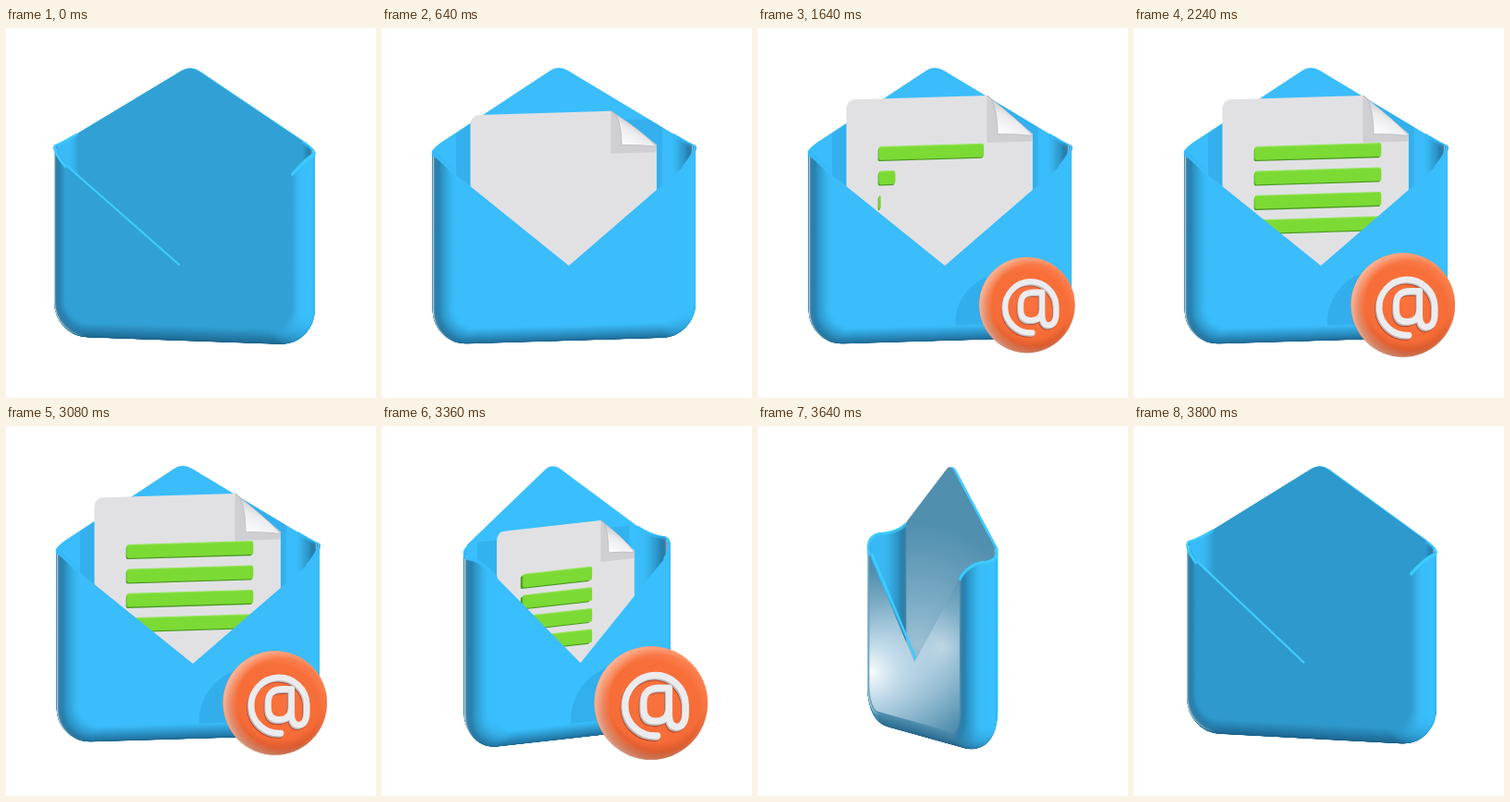
An HTML page with a canvas that plays this animation: 400 by 400 pixels, repeating every 4 s.

```html
<!DOCTYPE html>
<html lang="en">
<head>
<meta charset="utf-8">
<title>Envelope</title>
<style>
  html, body { margin: 0; width: 100%; height: 100%; overflow: hidden; background: #fff; }
  canvas { display: block; width: 400px; height: 400px; }
</style>
</head>
<body>
<canvas id="stage" width="400" height="400"></canvas>
<script>
const ctx = document.getElementById('stage').getContext('2d');
const LOOP = 4000, PITCH = 0.115, CX = 195;
const HALF = 145.5, BOTTOM = 336.5, BEVEL = 18, SLICES = 60;
const BACK = -14, MID = 7, FRONT = 28;
const APEX = 42, ROOF = 0.61, MOUTH = 254, SLANT = 0.81;
const CYAN = [62, 204, 255], DARK = [24, 88, 128], WHITE = [255, 255, 255];

// Surface colour by the direction it faces, in degrees from the viewer.
const RAMP = [
  [-180, 44, 146, 200], [-110, 34, 100, 140], [-86, 52, 112, 142], [-76, 214, 238, 248],
  [-68, 82, 144, 176], [-58, 52, 124, 164], [-42, 38, 130, 178], [-25, 46, 153, 204],
  [-17, 49, 161, 213], [0, 54, 180, 238], [14, 58, 189, 250], [60, 56, 192, 255],
  [95, 50, 176, 236], [180, 44, 146, 200]
];

// Keys: time, value, slope per ms.
const TURN = [[80, -17, 0], [640, 14.5, 0], [3080, 14.5, 0], [3360, 44, 0.3], [3640, 292, 0.5], [3800, 335, 0.1]];
const BADGE = [[1200, 0, 0], [1420, 61, 0], [1640, 51.5, 0], [1860, 58.5, 0], [2080, 55, 0],
  [2240, 56, 0], [3080, 56, 0], [3360, 61, 0], [3580, 0, -0.3]];
const LINE_STARTS = [1250, 1450, 1550, 1640];

const clamp = (v, lo = 0, hi = 1) => Math.min(hi, Math.max(lo, v));
const rgb = (c, a = 1) => `rgba(${c.map(Math.round).join()},${a})`;
const mix = (p, q, k) => p.map((v, i) => v + (q[i] - v) * k);
const wrap = d => ((d + 180) % 360 + 360) % 360 - 180;
const inOut = p => p < 0.5 ? 4 * p ** 3 : 1 - 4 * (1 - p) ** 3;

function track(keys, t) {
  if (t <= keys[0][0]) return keys[0][1];
  for (let i = 1; i < keys.length; i++) {
    const [t0, v0, m0] = keys[i - 1], [t1, v1, m1] = keys[i];
    if (t > t1) continue;
    const d = t1 - t0, p = (t - t0) / d, q = 1 - p;
    return v0 * (1 + 2 * p) * q * q + m0 * d * p * q * q + v1 * p * p * (3 - 2 * p) - m1 * d * p * p * q;
  }
  return keys[keys.length - 1][1];
}

function shade(deg) {
  const d = wrap(deg);
  const i = Math.max(1, RAMP.findIndex(r => r[0] >= d));
  const [a0, ...c0] = RAMP[i - 1], [a1, ...c1] = RAMP[i];
  return mix(c0, c1, (d - a0) / (a1 - a0));
}

// A thin wall shows its inner side when the outer one faces away.
function wallShade(deg) {
  const d = wrap(deg);
  return shade(Math.abs(d) < 90 ? d : d + 180);
}

// View of the current moment.
let turn = 0, cos = 1, sin = 0;

function at(path, z) {
  const out = new Path2D();
  out.addPath(path, new DOMMatrix([cos, -sin * PITCH, 0, 1, CX + z * sin, z * cos * PITCH]));
  return out;
}
const point = (x, y, z) => [CX + x * cos + z * sin, y + PITCH * (z * cos - x * sin)];
const rimColor = () => rgb(turn < 0 ? CYAN : shade(turn));

function fill(path, z, style) {
  ctx.fillStyle = style;
  ctx.fill(at(path, z));
}

function inside(path, z, draw) {
  ctx.save();
  ctx.clip(at(path, z));
  draw();
  ctx.restore();
}

function glow(x, y, r, alpha) {
  const g = ctx.createRadialGradient(x, y, 0, x, y, r);
  g.addColorStop(0, rgb(WHITE, alpha));
  g.addColorStop(0.3, rgb([225, 240, 250], alpha * 0.75));
  g.addColorStop(1, rgb([200, 222, 236], 0));
  return g;
}

// Left side, rounded bottom and right side of the pocket.
function pocket(path, inset, top) {
  const w = HALF - inset, b = BOTTOM - inset, r = 36 - inset * 0.6;
  path.lineTo(-w, top);
  path.arcTo(-w, b, 0, b, r);
  path.arcTo(w, b, w, top, r);
  path.lineTo(w, top);
  return path;
}

const edge = HALF - BEVEL;
const backTop = inset => APEX + ROOF * (HALF - inset);
const lip = MOUTH - SLANT * edge;
const frontTop = inset => backTop(0) + (lip - backTop(0)) * inset / BEVEL;

const backPanel = pocket(new Path2D(), BEVEL, backTop(BEVEL));
backPanel.arcTo(0, APEX, -edge, backTop(BEVEL), 19);
backPanel.closePath();

const frontPanel = pocket(new Path2D(), BEVEL, lip);
frontPanel.lineTo(0, MOUTH);
frontPanel.closePath();

const leftLip = new Path2D(`M${-edge} ${lip}L0 ${MOUTH}`);
const atSign = new Path2D('M14 -17H4Q-12 -17 -12 -2V4Q-12 17 0 17Q14 17 14 3M14 -17V10Q14 23 22 23Q31 22 31 8V0A31 31 0 1 0 2 32');

function drawBack(paperDrop) {
  fill(backPanel, BACK - 3, rimColor());
  fill(backPanel, BACK, rgb(shade(turn)));
  const k = clamp(1 - Math.abs(turn + 68) / 22);
  if (k) fill(backPanel, BACK, glow(172, 235, 130, 0.45 * k));
  if (paperDrop < 150) inside(backPanel, BACK, () => {
    const shadow = new Path2D();
    shadow.rect(-115, 86 + paperDrop, 230, 240);
    fill(shadow, BACK, 'rgba(0,80,140,.12)');
  });
}

function drawWall(step) {
  const a = (step + 0.5) / SLICES * Math.PI, deg = a * 180 / Math.PI;
  const inset = BEVEL * (1 - Math.sin(a));
  const z = MID - (FRONT - MID) * Math.cos(a);
  const top = deg < 90 ? backTop(inset) : frontTop(inset);
  const base = mix(shade(turn), DARK, 0.85 * Math.sin(a));
  const w = HALF - inset;
  const left = point(-w, top, z), right = point(w, top, z);
  const g = ctx.createLinearGradient(left[0], 0, right[0], 0);
  g.addColorStop(0, rgb(wallShade(turn - 180 + deg)));
  g.addColorStop(0.12, rgb(base));
  g.addColorStop(0.88, rgb(base));
  g.addColorStop(1, rgb(wallShade(turn + 180 - deg)));
  ctx.strokeStyle = g;
  ctx.lineWidth = 2.4;
  ctx.stroke(at(pocket(new Path2D(), inset + 0.6, top), z));
  ctx.fillStyle = rimColor();
  for (const [x, y] of [left, right]) ctx.fillRect(x - 1.2, y - 0.5, 2.4, 3);
}

function drawPaper(drop, t) {
  if (drop > 186) return;
  const top = 74 + drop, fold = 43 - 0.3 * Math.min(drop, 20), z = 5;
  const low = Math.max(300, top + 60);
  const sheet = new Path2D(`M-104 ${low}V${top + 11}Q-104 ${top} -93 ${top}H53L104 ${top + fold}V${low}Z`);
  const curl = new Path2D(`M53 ${top}Q64 ${top + 4} 65 ${top + fold - 1}Q84 ${top + fold - 1} 104 ${top + fold + 2}Q90 ${top + fold - 14} 53 ${top}Z`);
  const under = new Path2D(`M53 ${top}V${top + fold + 8}H104V${top + fold}Z`);

  // The pocket holds whatever part of the sheet lies below its mouth.
  ctx.save();
  const bounds = new Path2D();
  bounds.rect(-HALF, 0, 2 * HALF, BOTTOM - 30);
  ctx.clip(at(bounds, z));
  fill(sheet, z, '#e1e1e4');
  fill(under, z, '#cfcfd3');
  const [x0, y0] = point(65, top + fold, z), [x1, y1] = point(82, top + 12, z);
  const g = ctx.createLinearGradient(x0, y0, x1, y1);
  g.addColorStop(0, '#ffffff');
  g.addColorStop(0.6, '#ececef');
  g.addColorStop(1, '#c4c5ca');
  fill(curl, z, g);
  ctx.strokeStyle = '#b2b3b9';
  ctx.lineWidth = 0.7;
  ctx.stroke(at(curl, z));

  const erase = clamp((t - 3080) / 510) ** 2.25;
  LINE_STARTS.forEach((start, i) => {
    const width = 141 * inOut(clamp((t - start) / 600)) * (1 - erase);
    if (width < 0.5) return;
    const y = 125 + 26.4 * i + (t > 3000 ? drop * (0.9 - 0.12 * i) : 0);
    const bar = (dx, dy, depth, style) => {
      const p = new Path2D();
      p.roundRect(-69 + dx, y + dy, width, 13.5, Math.min(2, width / 2));
      fill(p, depth, style);
    };
    bar(0, 3, 6, '#4a9a22');
    bar(0, 1.5, 8, '#58b025');
    bar(0, 0, 10, '#92e455');
    bar(0, 1.2, 10, '#7cda34');
  });
  ctx.restore();
}

function drawFront(radius) {
  if (turn < 0 && cos > 0) {
    ctx.strokeStyle = rgb(CYAN);
    ctx.lineWidth = 2.6;
    ctx.stroke(at(leftLip, FRONT - 3));
  }
  fill(frontPanel, FRONT, rgb(shade(turn)));
  const k = clamp(1 - Math.abs(turn + 68) / 22);
  if (k) {
    fill(frontPanel, FRONT, glow(122, 266, 110, k));
    fill(frontPanel, FRONT, glow(200, 238, 85, 0.55 * k));
  }
  if (radius > 1 && cos > 0) inside(frontPanel, FRONT, () => {
    ctx.fillStyle = 'rgba(0,70,130,.12)';
    ctx.beginPath();
    ctx.arc(265, 318, radius, 0, 7);
    ctx.fill();
  });
}

function drawBadge(radius) {
  if (radius < 0.5) return;
  const s = radius / 56;
  ctx.save();
  ctx.translate(290.8, 299.5);
  ctx.scale(s, s);
  const disc = new Path2D();
  disc.arc(0, 0, 56.3, 0, 7);
  const body = ctx.createRadialGradient(5, -9, 10, 5, -9, 66);
  body.addColorStop(0, '#f9713c');
  body.addColorStop(0.68, '#f66c37');
  body.addColorStop(0.84, '#de5c2d');
  body.addColorStop(1, '#a83f1c');
  ctx.fillStyle = body;
  ctx.fill(disc);
  // soft light on the upper rim and along the left side
  const rim = (x, y, color) => {
    const g = ctx.createRadialGradient(x, y, 48, x, y, 62);
    g.addColorStop(0, `rgba(${color},0)`);
    g.addColorStop(1, `rgba(${color},.6)`);
    ctx.fillStyle = g;
    ctx.fill(disc);
  };
  rim(0, 7, '255,150,105');
  rim(7, 0, '255,225,210');

  ctx.lineCap = ctx.lineJoin = 'round';
  const sign = (x, y, color) => {
    ctx.save();
    ctx.translate(x, y);
    ctx.scale(0.97, 0.97);
    ctx.strokeStyle = color;
    ctx.lineWidth = 6.8;
    ctx.stroke(atSign);
    ctx.restore();
  };
  sign(2.8, 3.8, '#b9472a');
  sign(3.4, 2.8, '#bcb6b5');
  sign(4.4, 1.4, '#ececee');
  ctx.restore();
}

function draw(t) {
  turn = wrap(track(TURN, t));
  const rad = turn * Math.PI / 180;
  sin = Math.sin(rad);
  cos = Math.cos(rad);
  if (Math.abs(cos) < 0.01) cos = cos < 0 ? -0.01 : 0.01;

  const drop = t < 3080
    ? 190 * (1 - clamp((t - 240) / 723)) ** 3
    : 190 * clamp((t - 3080) / 510) ** 3;
  const radius = Math.max(0, track(BADGE, t));

  ctx.fillStyle = '#fff';
  ctx.fillRect(0, 0, 400, 400);

  const walls = Array.from({ length: SLICES }, (_, i) => () => drawWall(i));
  const parts = [
    () => drawBack(drop),
    ...walls.slice(0, SLICES / 2),
    () => drawPaper(drop, t),
    ...walls.slice(SLICES / 2),
    () => drawFront(radius)
  ];
  if (cos < 0) parts.reverse();
  parts.forEach(part => part());
  drawBadge(radius);
}

const begin = performance.now();
function frame() {
  draw((performance.now() - begin) % LOOP);
  requestAnimationFrame(frame);
}
frame();
</script>
</body>
</html>
```
